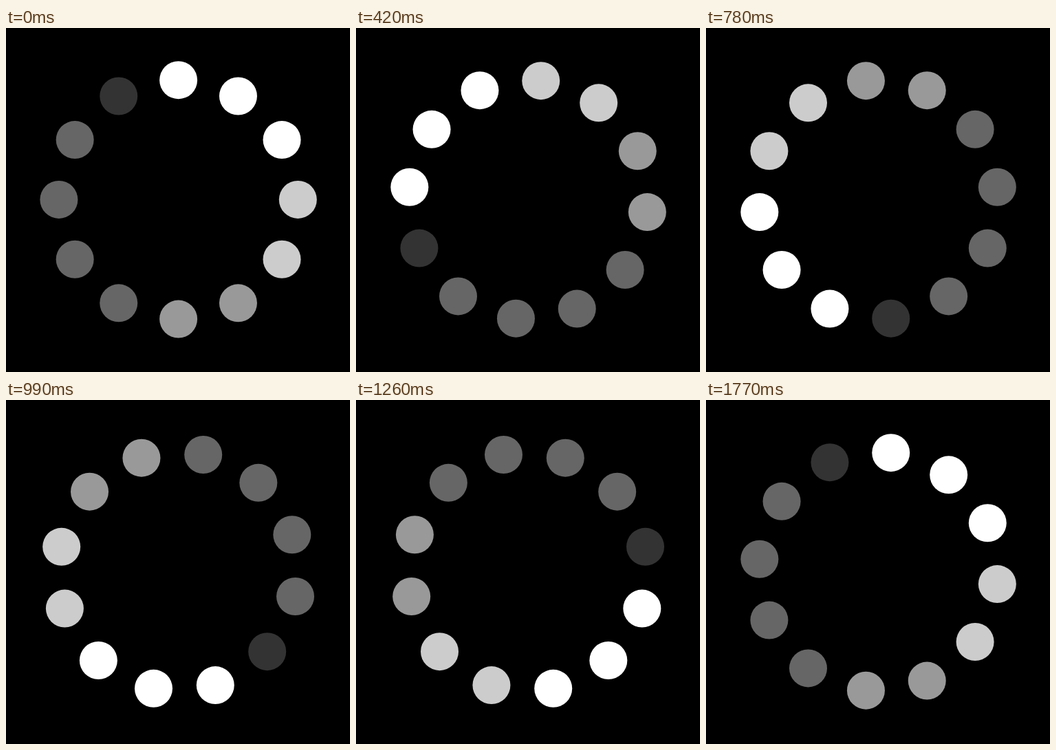
Animation of 500 by 500 pixels, one loop 1800 ms. Source, as an HTML page with a canvas:

```html
<!DOCTYPE html>
<html lang="en">
<head>
<meta charset="utf-8">
<title>Loading spinner</title>
<style>
  html, body { margin: 0; width: 100%; height: 100%; overflow: hidden; background: #000; }
  canvas { display: block; }
</style>
</head>
<body>
<canvas id="stage" width="500" height="500"></canvas>
<script>
const ctx = document.getElementById('stage').getContext('2d');
const SIZE = 500, LOOP = 1800, STEP = 30;
const CX = 250.6, CY = 249.4, RING = 173.7, DOT = 27.5;
// Clockwise from the top
const SHADES = ['#fff', '#fff', '#fff', '#ccc', '#ccc', '#999', '#999',
                '#666', '#666', '#666', '#666', '#333'];

function draw(ms) {
  const step = Math.floor((ms % LOOP) / STEP + 0.01);
  const turn = step * STEP / LOOP * 2 * Math.PI;
  ctx.fillStyle = '#000';
  ctx.fillRect(0, 0, SIZE, SIZE);
  SHADES.forEach((shade, i) => {
    const a = i / SHADES.length * 2 * Math.PI - turn;
    ctx.fillStyle = shade;
    ctx.beginPath();
    ctx.arc(CX + RING * Math.sin(a), CY - RING * Math.cos(a), DOT, 0, 2 * Math.PI);
    ctx.fill();
  });
}

function tick() {
  draw(performance.now());
  requestAnimationFrame(tick);
}
draw(0);
requestAnimationFrame(tick);
</script>
</body>
</html>
```
